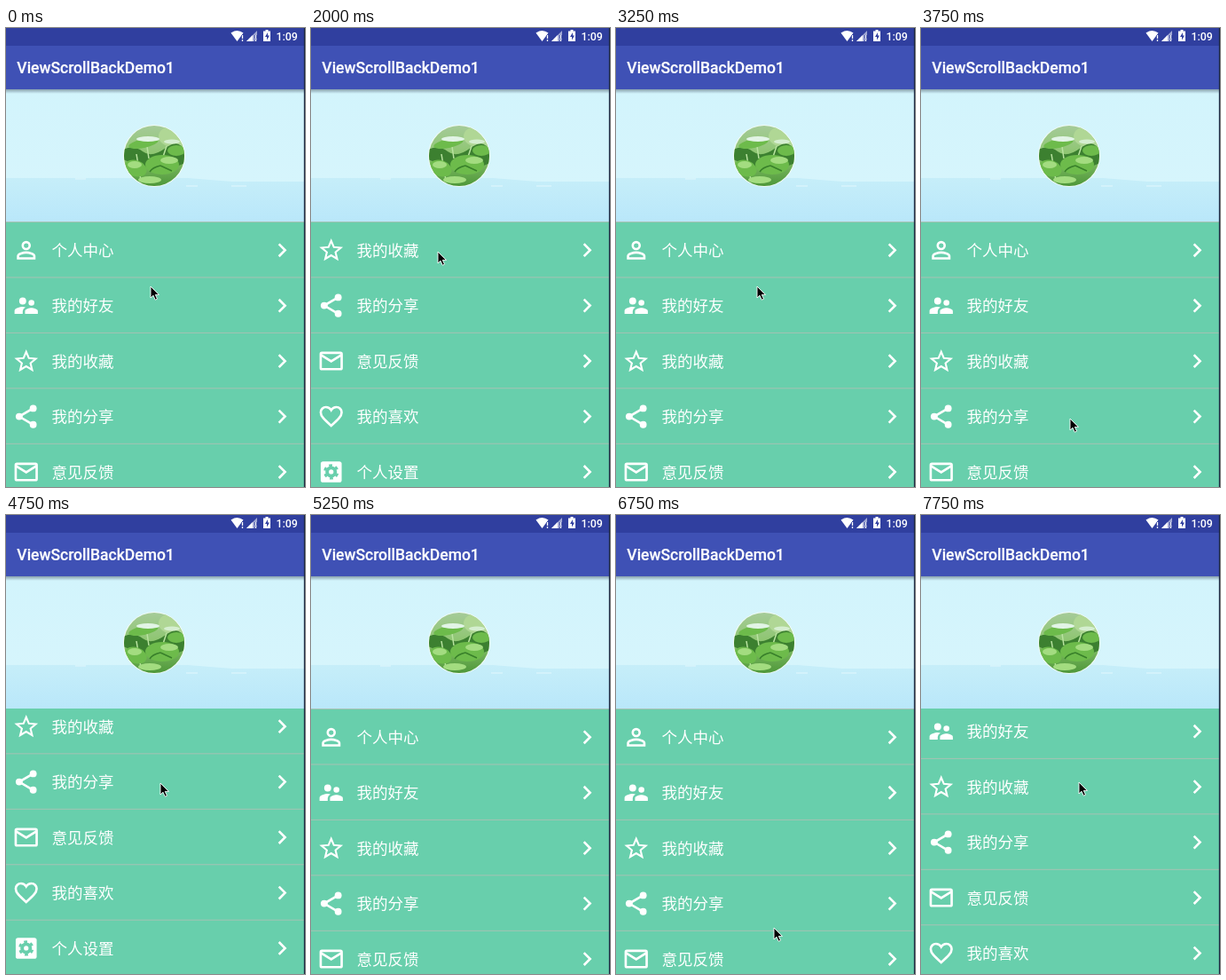
Write an HTML page that moves like this. It is 337 px wide and 517 px high and loops after 8 s.

```html
<!DOCTYPE html>
<html lang="zh">
<head>
<meta charset="utf-8">
<title>ViewScrollBackDemo1</title>
<style>
  html, body { margin: 0; width: 100%; height: 100%; overflow: hidden; background: #68cfac; }
  svg { display: block; }
  text { fill: #fff; font-family: Roboto, sans-serif; font-weight: 500; }
  .label { font: 400 17.5px "Noto Sans CJK SC", "Noto Sans CJK", sans-serif; }
  .solid { fill: #fff; }
  .line { fill: none; stroke: #fff; stroke-width: 2; }
  .thin { stroke-width: 1.6; }
  #list, #pointer { animation: scroll 8s step-end infinite; }
  #pointer { animation-name: point; }

  /* The picture advances every 250 ms, which is 3.125 % of the loop. */
  @keyframes scroll {
    0% { transform: translateY(0); }
    15.625% { transform: translateY(0); animation-timing-function: steps(3); }
    25% { transform: translateY(-125px); }
    37.5% { transform: translateY(0); }
    46.875% { transform: translateY(0); animation-timing-function: steps(3); }
    56.25% { transform: translateY(-120px); }
    59.375% { transform: translateY(-137px); }
    62.5% { transform: translateY(-20px); }
    65.625% { transform: translateY(0); }
    96.875%, 100% { transform: translateY(-69px); }
  }
  @keyframes point {
    0% { transform: translate(163px, 291px); animation-timing-function: steps(4); }
    12.5% { transform: translate(166px, 470px); }
    15.625% { transform: translate(152px, 377px); animation-timing-function: steps(3); }
    25% { transform: translate(143px, 252px); animation-timing-function: steps(3); }
    34.375% { transform: translate(146px, 235px); }
    37.5% { transform: translate(156px, 360px); }
    40.625% { transform: translate(159px, 291px); animation-timing-function: steps(2); }
    46.875% { transform: translate(168px, 440px); animation-timing-function: steps(3); }
    56.25% { transform: translate(173px, 320px); }
    59.375% { transform: translate(174px, 302px); }
    62.5% { transform: translate(177px, 420px); }
    65.625% { transform: translate(180px, 530px); }
    71.875% { transform: translate(180px, 500px); animation-timing-function: steps(4); }
    84.375% { transform: translate(178px, 465px); animation-timing-function: steps(3); }
    93.75% { transform: translate(178px, 371px); }
    96.875%, 100% { transform: translate(178px, 301px); }
  }
</style>
</head>
<body>
<svg width="337" height="517" viewBox="0 0 337 517">
  <defs>
    <linearGradient id="sky" x2="0" y2="1">
      <stop stop-color="#d2f4fc"/><stop offset="1" stop-color="#d6f5fc"/>
    </linearGradient>
    <linearGradient id="sea" x2="0" y2="1">
      <stop stop-color="#c6eef9"/><stop offset="1" stop-color="#b9e7fa"/>
    </linearGradient>
    <linearGradient id="shade" x2="0" y2="1">
      <stop stop-color="#567" stop-opacity=".6"/><stop offset="1" stop-color="#567" stop-opacity="0"/>
    </linearGradient>
    <linearGradient id="meadow" x2="0" y2="1">
      <stop stop-color="#a6cb9a"/><stop offset=".45" stop-color="#8fc672"/><stop offset="1" stop-color="#4c9638"/>
    </linearGradient>
    <clipPath id="view"><path d="M0 218h337v299H0z"/></clipPath>
    <clipPath id="disc"><circle cx="167" cy="144" r="34"/></clipPath>
  </defs>

  <path d="M0 69h337v106H0z" fill="url(#sky)"/>
  <path d="M0 169h205l50 4h82v46H0z" fill="url(#sea)"/>
  <path d="M203 178h13M254 178h17M78 170h12" stroke="#e2f8fd"/>

  <circle cx="167" cy="144" r="35" fill="#f2fbf6"/>
  <g clip-path="url(#disc)">
    <path d="M132 109h70v70h-70z" fill="url(#meadow)"/>
    <ellipse cx="189" cy="122" rx="17" ry="12" fill="#b0d795"/>
    <path d="M132 137q12-6 22 2t26-4 22 6v11q-30 14-70-4z" fill="#3c8030"/>
    <path d="M158 127l3 20M181 133l-4 12M147 142l5 30" stroke="#b9e3a0" stroke-width="1.5"/>
    <g fill="#6dbb4b">
      <ellipse cx="155" cy="130" rx="17" ry="5" transform="rotate(-12 155 130)"/>
      <ellipse cx="176" cy="154" rx="19" ry="11"/>
      <ellipse cx="146" cy="158" rx="13" ry="9" transform="rotate(20 146 158)"/>
      <ellipse cx="192" cy="138" rx="10" ry="6"/>
    </g>
    <g fill="#a3dc80">
      <ellipse cx="184" cy="149" rx="10" ry="4"/>
      <ellipse cx="145" cy="154" rx="8" ry="4"/>
      <ellipse cx="162" cy="171" rx="13" ry="4"/>
    </g>
    <ellipse cx="160" cy="125" rx="13" ry="3" fill="#e2f4e6"/>
    <ellipse cx="187" cy="128" rx="9" ry="2.500" fill="#d5eed0"/>
    <path d="M174 155q-9 2-12 7M174 155l13 6" fill="none" stroke="#38802a" stroke-width="1.500"/>
  </g>

  <path d="M0 20h337v49H0z" fill="#3f51b5"/>
  <path d="M0 0h337v20H0z" fill="#303f9f"/>
  <path d="M0 69h337v5H0z" fill="url(#shade)"/>
  <text x="12.300" y="51" font-size="17.5" stroke="#fff" stroke-width=".2">ViewScrollBackDemo1</text>

  <g class="solid">
    <path d="M253.500 5.500q7-5 14 0L260.500 15z"/>
    <path d="M283 3v12h-12z" opacity=".55"/>
    <path d="M278 8v7h-7z"/>
    <path d="M292.500 2h3v1.500h2.500V15h-8V3.500h2.500z"/>
  </g>
  <path d="M295 5l-3 5h2v3.500l3-5h-2z" fill="#303f9f"/>
  <path d="M266.500 8v4m0 1v2M281.500 8v4m0 1v2" stroke="#303f9f" stroke-width="3"/>
  <path d="M266.500 8v4m0 1v2M281.500 8v4m0 1v2" stroke="#fff" stroke-width="1.300"/>
  <text x="304.500" y="14" font-size="12.300">1:09</text>

  <g clip-path="url(#view)">
    <path d="M0 218h337v299H0z" fill="#68cfac"/>
    <g id="list"></g>
  </g>
  <path d="M336.400 0v517" stroke="#1c2740" stroke-width="1.200"/>
  <g id="pointer">
    <path d="M0 0v13l3-2.800 2.200 5 2.300-1-2.200-4.800h4.200z" fill="#000" stroke="#fff" stroke-width=".9"/>
  </g>
</svg>
<script>
  const line = (d, kind = '') => `<path class="line ${kind}" d="${d}"/>`;
  const solid = d => `<path class="solid" d="${d}"/>`;
  const dot = (x, y, r) => `<circle class="solid" cx="${x}" cy="${y}" r="${r}"/>`;

  // Icons are drawn in a 24-unit box.
  const items = [
    ['个人中心', '<circle class="line" cx="12" cy="8" r="3"/>' +
      line('M5 19v-2c0-1.900 4.500-3 7-3s7 1.100 7 3v2z')],
    ['我的好友', dot(9, 8, 3) + dot(16.5, 9.5, 2.5) +
      solid('M11 19v-2.250C11 14.900 14.700 14 16.500 14s5.500.9 5.500 2.750V19z') +
      solid('M2 19v-2.500C2 14.200 6.700 13 9 13q1.200 0 2.400.3Q9 14.600 9 16.750V19z')],
    ['我的收藏', line('M12 4.100l2.300 5.400 5.900.5-4.500 3.800 1.400 5.700-5.100-3-5.100 3 1.400-5.700L3.800 10l5.900-.5z', 'thin')],
    ['我的分享', dot(18, 5, 3) + dot(6, 12, 3) + dot(18, 19, 3) + line('M18 5L6 12l12 7')],
    ['意见反馈', '<rect class="line" x="3" y="5" width="18" height="14" rx="1"/>' + line('M3 6.800l9 5.500 9-5.500')],
    ['我的喜欢', line('M12 20C6 14.600 3 11.800 3 8.500 3 6 5 4 7.500 4 9.300 4 11 5 12 6.600 13 5 14.700 4 16.500 4 19 4 21 6 21 8.500c0 3.300-3 6.100-9 11.500z')],
    ['个人设置', '<rect class="solid" x="3" y="3" width="18" height="18" rx="2"/>' +
      '<g fill="none" stroke="#68cfac"><circle cx="12" cy="12" r="3.500" stroke-width="3"/>' +
      '<circle cx="12" cy="12" r="5.600" stroke-width="2" pathLength="12" stroke-dasharray="1 1" stroke-dashoffset="-.5"/></g>']
  ];
  const chevron = solid('M10 6L8.600 7.400 13.200 12l-4.600 4.600L10 18l6-6z');
  const scale = 1.3125, pitch = 62.45;

  document.getElementById('list').innerHTML = items.map(([name, icon], i) => `
    <g transform="translate(0 ${218.5 + i * pitch})">
      <path d="M0 0h336" stroke="#a6c2b4"/>
      <g transform="translate(7 16) scale(${scale})">${icon}</g>
      <text class="label" x="51.500" y="38.400">${name}</text>
      <g transform="translate(295.400 16) scale(${scale})">${chevron}</g>
    </g>`).join('');
</script>
</body>
</html>
```
